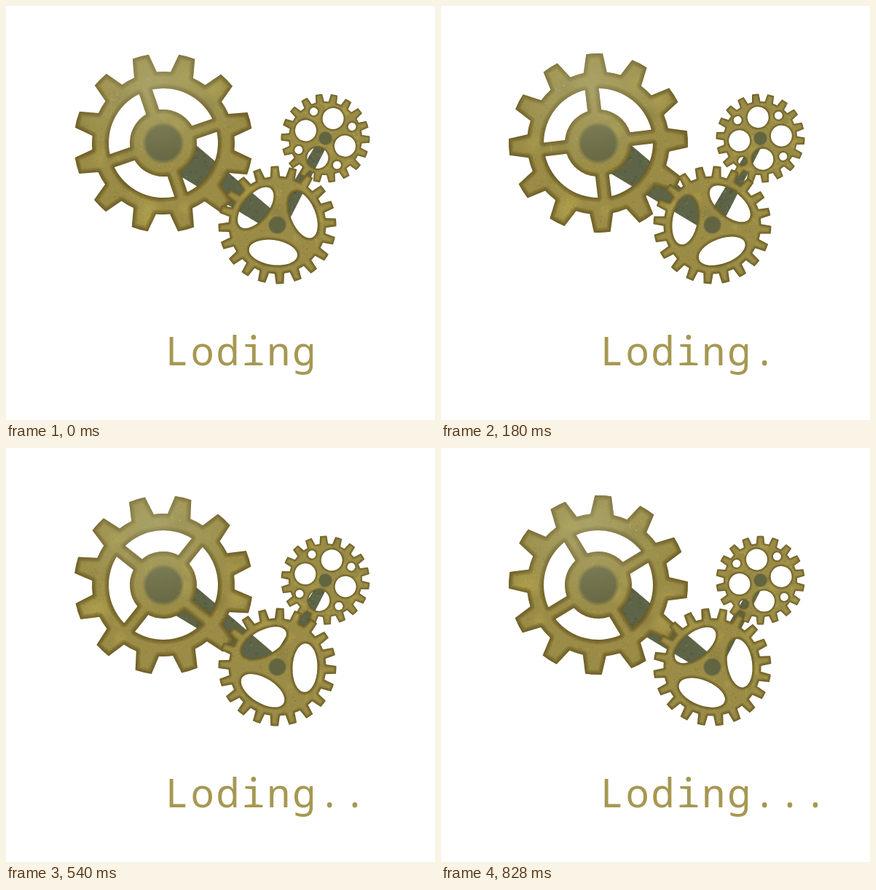
An HTML page with a canvas for the animation above (900 ms loop, 589 by 568 pixels).

```html
<!DOCTYPE html>
<html lang="en">
<head>
<meta charset="utf-8">
<title>Loading gears</title>
<style>
  html, body { margin: 0; width: 100%; height: 100%; overflow: hidden; background: #fff; }
  canvas { display: block; }
</style>
</head>
<body>
<canvas id="stage" width="589" height="568"></canvas>
<script>
const ctx = document.getElementById('stage').getContext('2d');
const TAU = Math.PI * 2, RAD = Math.PI / 180;
const STEP = 180, STEPS = 5;
const DOTS = [0, 1, 1, 2, 3];

// Angles are in degrees, one pose per step.
const gears = [
  { x: 216, y: 188, tip: 123, root: 98, teeth: 12, tipHalf: 5.3, rootHalf: 9.4, toothShift: 4.3,
    hub: 27, edge: 13, seed: 7, holes: spokedWindows,
    pose: k => -19 + 90 * k / STEPS - 6.1 * Math.sin(TAU * k / STEPS) },
  { x: 438.5, y: 181.5, tip: 61, root: 50.5, teeth: 18, tipHalf: 4.4, rootHalf: 6.6, toothShift: 0,
    hub: 8, edge: 6, seed: 23, holes: roundHoles,
    pose: k => [21.5, 83.5, 134.5, 107.5, -10][k] },
  { x: 372.5, y: 300.5, tip: 81, root: 67, teeth: 20, tipHalf: 3.8, rootHalf: 5.7, toothShift: 1,
    hub: 11, edge: 8, seed: 41, holes: ovalHoles,
    pose: k => [-21.5, -50.3, -98, 1.7, -8][k] }
];

function randomizer(seed) {
  return () => (seed = seed * 16807 % 2147483647) / 2147483647;
}

function spokedWindows(path) {
  const inner = 46, outer = 75, half = 9.5;
  const a = Math.asin(half / outer), b = Math.asin(half / inner), quarter = TAU / 4;
  for (let i = 0; i < 4; i++) {
    const start = i * quarter, win = new Path2D();
    win.arc(0, 0, outer, start + a, start + quarter - a);
    win.arc(0, 0, inner, start + quarter - b, start + b, true);
    win.closePath();
    path.addPath(win);
  }
}

function addOval(path, angle, distance, rx, ry) {
  const oval = new Path2D();
  oval.ellipse(distance * Math.cos(angle), distance * Math.sin(angle), rx, ry, angle, 0, TAU);
  path.addPath(oval);
}

function ovalHoles(path) {
  for (let i = 0; i < 3; i++) addOval(path, i * TAU / 3, 38, 17, 33.5);
}

function roundHoles(path) {
  for (let i = 0; i < 4; i++) {
    addOval(path, i * TAU / 4, 29, 14.5, 14.5);
    addOval(path, (i + 0.5) * TAU / 4, 40, 5.5, 5.5);
  }
}

function gearPath(g) {
  const path = new Path2D();
  for (let i = 0; i < g.teeth; i++) {
    const mid = i * TAU / g.teeth + g.toothShift * RAD;
    const base = g.rootHalf * RAD, top = g.tipHalf * RAD;
    const next = mid + TAU / g.teeth - base;
    path.lineTo(g.root * Math.cos(mid - base), g.root * Math.sin(mid - base));
    path.arc(0, 0, g.tip, mid - top, mid + top);
    path.arc(0, 0, g.root, mid + base, next);
  }
  path.closePath();
  g.holes(path);
  return path;
}

function glow(x, y, r, color, solid = 0) {
  const fill = ctx.createRadialGradient(x, y, 0, x, y, r);
  fill.addColorStop(0, `rgba(${color})`);
  fill.addColorStop(solid, `rgba(${color})`);
  fill.addColorStop(1, `rgba(${color.replace(/[^,]+$/, '0')})`);
  ctx.fillStyle = fill;
  ctx.fillRect(x - r, y - r, 2 * r, 2 * r);
}

// Mottled rust, scratches and grain.
function weather(size, seed) {
  const rnd = randomizer(seed);
  const spot = () => {
    const a = rnd() * TAU, r = size * Math.sqrt(rnd());
    return [r * Math.cos(a), r * Math.sin(a)];
  };
  for (let i = 0; i < 26; i++) {
    glow(...spot(), size * (0.06 + 0.12 * rnd()), i % 3 ? '190,174,80,.36' : '104,96,50,.26');
  }
  for (let i = 0; i < size * 9; i++) {
    const [x, y] = spot();
    ctx.fillStyle = rnd() < 0.5 ? 'rgba(205,192,102,.27)' : 'rgba(75,64,26,.2)';
    ctx.fillRect(x, y, 0.6 + 1.3 * rnd(), 0.6 + 1.3 * rnd());
  }
  ctx.lineWidth = 0.7;
  ctx.strokeStyle = 'rgba(214,198,115,.45)';
  for (let i = 0; i < 12; i++) {
    const [x, y] = spot();
    ctx.beginPath();
    ctx.moveTo(x, y);
    ctx.lineTo(x + (rnd() - 0.5) * size * 0.3, y + (rnd() - 0.5) * size * 0.3);
    ctx.stroke();
  }
}

function drawGear(g, k) {
  ctx.save();
  ctx.translate(g.x, g.y);
  ctx.rotate(g.pose(k) * RAD);
  ctx.clip(g.path, 'evenodd');
  ctx.fillStyle = '#9a8c46';
  ctx.fill(g.path, 'evenodd');
  weather(g.tip, g.seed);
  ctx.lineJoin = 'round';
  ctx.strokeStyle = 'rgba(78,62,22,.13)';
  for (let i = 1; i <= 6; i++) {
    ctx.lineWidth = g.edge * i / 6;
    ctx.stroke(g.path);
  }
  glow(0, 0, g.hub + 2, '96,98,64,.95', 0.8);
  ctx.rotate(-g.pose(k) * RAD);
  if (g === gears[0]) glow(-12, -80, 120, '184,184,136,.5');
  ctx.restore();
}

function drawRod(from, to, startHalf, endHalf, seed) {
  const dx = to.x - from.x, dy = to.y - from.y, length = Math.hypot(dx, dy);
  const rnd = randomizer(seed);
  ctx.save();
  ctx.translate(from.x, from.y);
  ctx.rotate(Math.atan2(dy, dx));
  ctx.beginPath();
  ctx.moveTo(0, -startHalf);
  ctx.lineTo(length, -endHalf);
  ctx.lineTo(length, endHalf);
  ctx.lineTo(0, startHalf);
  ctx.fillStyle = '#5d6447';
  ctx.fill();
  ctx.clip();
  for (let i = 0; i < 160; i++) {
    ctx.fillStyle = i % 3 ? 'rgba(56,65,46,.25)' : 'rgba(136,136,76,.3)';
    ctx.fillRect(rnd() * length, (rnd() * 2 - 1) * startHalf, 1 + 3 * rnd(), 1 + 2 * rnd());
  }
  ctx.restore();
}

function draw(k) {
  const [big, small, middle] = gears;
  ctx.fillStyle = '#fff';
  ctx.fillRect(0, 0, 589, 568);
  drawRod(big, middle, 27, 11.5, 5);
  drawRod(middle, small, 11.5, 6.5, 9);
  gears.forEach(g => drawGear(g, k));
  ctx.font = '500 54px "Noto Sans Mono", "DejaVu Sans Mono", monospace';
  ctx.letterSpacing = '2.5px';
  ctx.fillStyle = '#a69852';
  ctx.fillText('Loding' + '.'.repeat(DOTS[k]), 218.5, 493);
}

let shown = -1;
function tick() {
  const k = Math.floor(performance.now() / STEP) % STEPS;
  if (k !== shown) draw(shown = k);
  requestAnimationFrame(tick);
}

gears.forEach(g => g.path = gearPath(g));
tick();
</script>
</body>
</html>
```
